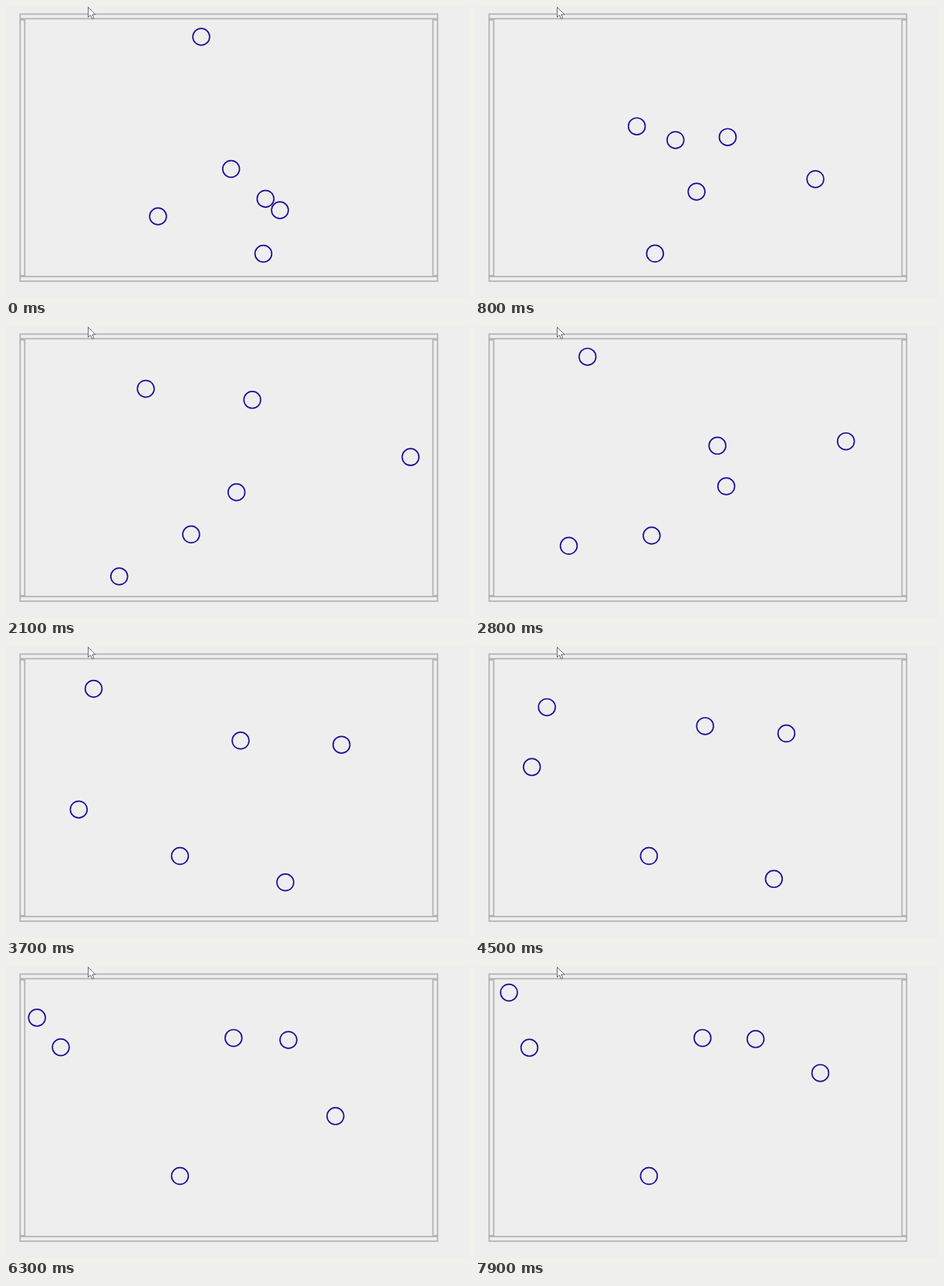
An HTML page with a canvas that plays this animation: 600x379 px, repeating every 8000 ms.

```html
<!DOCTYPE html>
<html lang="en">
<head>
<meta charset="utf-8">
<title>Rolling balls</title>
<style>
html, body { margin: 0; width: 100%; height: 100%; overflow: hidden; background: #efeeef; }
canvas { display: block; }
</style>
</head>
<body>
<canvas id="stage" width="600" height="379"></canvas>
<script>
const ctx = document.getElementById('stage').getContext('2d');
const LOOP = 8000, STEP = 100;
const FRICTION = 15.5;       // px per second squared
const WALL_BOUNCE = 0.81;    // speed kept at a wall
const HIT_TRANSFER = 0.995;  // share of the normal speed exchanged in a hit
const RADIUS = 10.9;
const AREA = { left: 36, right: 541, top: 28.7, bottom: 339 };

const ball = (x, y, vx, vy) => ({ x, y, vx, vy });
const balls = [
  ball(253, 40, -56.3, 151),
  ball(291.7, 211.5, 0, 0),
  ball(336.3, 250.2, -107.9, -60.7),
  ball(355, 265, 113.2, -53),
  ball(197, 273, 50.1, 115.6),
  ball(333.5, 321.5, -7.8, -195.4)
];
const [, still, cue, , low, fast] = balls;
const hits = [
  { ms: 340, a: cue, b: still, angle: 0.8662 },
  { ms: 1470, a: cue, b: low, angle: -0.895 },
  { ms: 2630, a: cue, b: fast, angle: 1.5158 }
];

// Equal masses trade their speed along the line of contact.
function collide({ a, b, angle }) {
  const nx = Math.cos(angle), ny = Math.sin(angle);
  const k = HIT_TRANSFER * ((b.vx - a.vx) * nx + (b.vy - a.vy) * ny);
  a.vx += k * nx;
  a.vy += k * ny;
  b.vx -= k * nx;
  b.vy -= k * ny;
}

function scaleSpeed(b, k) {
  b.vx *= k;
  b.vy *= k;
}

function bounce(b, axis, min, max) {
  const edge = Math.min(max, Math.max(min, b[axis]));
  if (edge === b[axis]) return;
  b[axis] = 2 * edge - b[axis];
  b['v' + axis] *= -1;
  scaleSpeed(b, WALL_BOUNCE);
}

function move(b, dt) {
  const speed = Math.hypot(b.vx, b.vy);
  if (!speed) return;
  scaleSpeed(b, Math.max(0, 1 - FRICTION * dt / speed));
  b.x += b.vx * dt;
  b.y += b.vy * dt;
  bounce(b, 'x', AREA.left, AREA.right);
  bounce(b, 'y', AREA.top, AREA.bottom);
}

// Run the table once in 1 ms steps and keep a snapshot for every picture.
function simulate() {
  const shots = [];
  for (let ms = 0; ms < LOOP; ms++) {
    if (ms % STEP === 0) shots.push(balls.map(({ x, y }) => [x, y]));
    hits.filter(h => h.ms === ms).forEach(collide);
    balls.forEach(b => move(b, 0.001));
  }
  return shots;
}

function drawWalls() {
  ctx.strokeStyle = '#b3b1b3';
  ctx.lineWidth = 1.7;
  for (const y of [10.5, 351.2]) ctx.strokeRect(18.3, y, 541, 6);
  for (const x of [18.3, 553.3]) ctx.strokeRect(x, 18, 6, 332);
}

function drawPointer() {
  ctx.beginPath();
  [[106.5, 1.5], [106.5, 14.5], [109.5, 11.8], [111.7, 16.6],
   [113.8, 15.6], [111.8, 11], [115.8, 11]].forEach(p => ctx.lineTo(...p));
  ctx.closePath();
  ctx.fillStyle = '#fff';
  ctx.fill();
  ctx.strokeStyle = '#68666c';
  ctx.lineWidth = 1;
  ctx.stroke();
}

function drawBall([x, y]) {
  ctx.beginPath();
  ctx.arc(x, y, RADIUS, 0, Math.PI * 2);
  ctx.strokeStyle = '#1b1199';
  ctx.lineWidth = 1.7;
  ctx.stroke();
}

const shots = simulate();

function draw(ms) {
  ctx.fillStyle = '#efeeef';
  ctx.fillRect(0, 0, 600, 379);
  drawWalls();
  shots[Math.floor((ms % LOOP) / STEP)].forEach(drawBall);
  drawPointer();
}

const start = performance.now();
function tick() {
  draw(performance.now() - start);
  requestAnimationFrame(tick);
}
tick();
</script>
</body>
</html>
```
